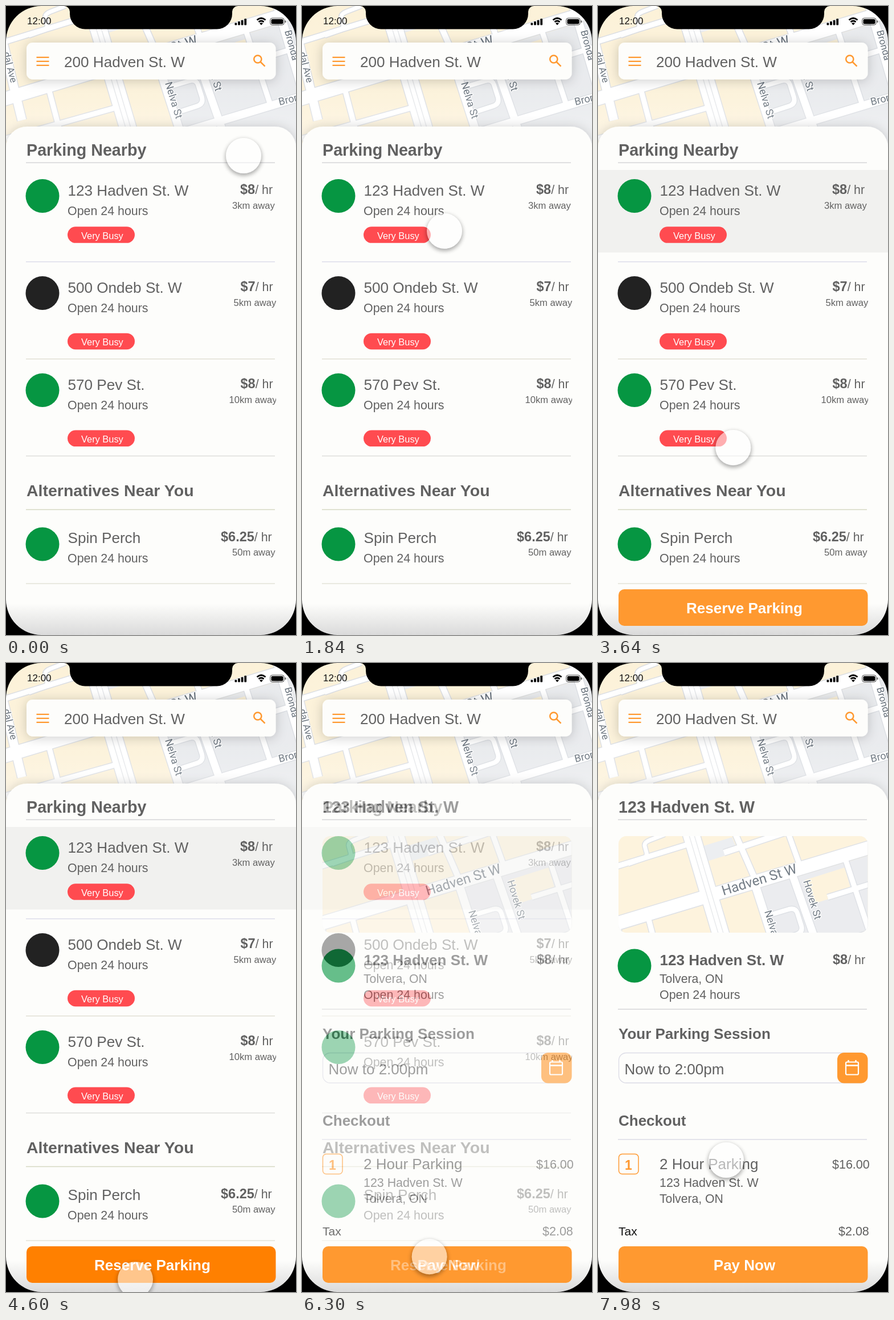
Write an HTML page that moves like this. It is 509 px wide and 1101 px high and loops after 8000 ms.

```html
<!DOCTYPE html>
<html lang="en">
<head>
<meta charset="utf-8">
<title>Parking app</title>
<style>
html, body { margin: 0; width: 100%; height: 100%; overflow: hidden; background: #000; }
#screen { position: relative; width: 100%; height: 100%; overflow: hidden; contain: strict; }
svg { position: absolute; left: 0; top: 0; display: block; }
text { font-family: "Liberation Sans", Arial, sans-serif; fill: #616161; white-space: pre; }
.street { font-family: Roboto, sans-serif; fill: #5a6570; stroke: #fff; stroke-width: 2.5px; paint-order: stroke; }
#touch {
  position: absolute; left: -31px; top: -31px; width: 62px; height: 62px; border-radius: 50%;
  background: rgba(255, 255, 255, .55); box-shadow: 0 3px 7px 1px rgba(0, 0, 0, .32);
}
</style>
</head>
<body>
<div id="screen">
  <svg id="stage" width="509" height="1101" viewBox="0 0 509 1101"></svg>
  <div id="touch"></div>
</div>
<script>
const ORANGE = '#ff9930', PAPER = '#fdfdfb', GREEN = '#069642';

const text = (x, y, size, str, extra = '') =>
  `<text x="${x}" y="${y}" font-size="${size}" ${extra}>${str}</text>`;
const bold = (x, y, size, str, extra = '') => text(x, y, size, str, 'font-weight="700" ' + extra);
const rect = (x, y, w, h, r, fill, extra = '') =>
  `<rect x="${x}" y="${y}" width="${w}" height="${h}" rx="${r}" fill="${fill}" ${extra}/>`;
const logo = (y, fill) => `<circle cx="64" cy="${y}" r="29.5" fill="${fill}"/>`;
const line = (y, color = '#d6d6d8') => rect(35, y - .75, 437, 1.5, 0, color);
const stroke = (d, color, width) =>
  `<path d="${d}" fill="none" stroke="${color}" stroke-width="${width}"/>`;
const price = (x, y, amount) =>
  `<text x="${x}" y="${y}" font-size="21.4"><tspan font-weight="700" font-size="23.5">${amount}</tspan>/ hr</text>`;
const street = (x, y, angle, size, str) =>
  text(x, y, size, str, `class="street" transform="rotate(${angle} ${x} ${y})"`);

function streetMap() {
  const roads = [
    ['M-10 45L28 200', 15], ['M0 62L150 16', 9], ['M40 52L68 42Q75 38 71 28L69 20Q68 14 78 10L104 0', 7],
    ['M75 145L100 240', 9], ['M0 232L200 176', 9], ['M224 -10L266 86', 10], ['M208 32L330 -8', 10],
    ['M318 -10L345 65', 9], ['M262 86L312 240', 14], ['M328 70L388 240', 13],
    ['M282 143L322 131Q334 128 337 138L344 160Q347 171 336 175L296 188', 8],
    ['M300 224L520 158', 14], ['M390 110L520 70', 9], ['M420 40L465 176', 9], ['M474 -10L530 180', 15],
    ['M-20 168L520 6', 23], ['M146 -15L222 240', 29]
  ];
  return rect(-30, -10, 560, 270, 0, '#fcf1d7') +
    '<path d="M268 95L520 20V260H312Z" fill="#e7e9ec"/>' +
    '<path d="M166 22L222 5L233 30L176 48Z" fill="#e9ebee"/>' +
    '<path d="M350 80L420 58L432 100L364 122Z" fill="#fcf1d7"/>' +
    roads.map(([d, w]) => stroke(d, '#d9dce1', w + 3)).join('') +
    roads.map(([d, w]) => stroke(d, '#fff', w)).join('') +
    stroke('M142 -15L218 240M151 -15L227 240', '#e4e6e9', 1.5) +
    street(207, 107, -17, 24, 'Hadven St W') + street(279, 135, 73, 18, 'Nelva St') +
    street(347, 82, 73, 18, 'Hovek St') + street(489, 44, 75, 17, 'Bronda') +
    street(480, 174, -14, 18, 'Brondal') + street(-5, 82, 76, 17, 'dal Ave');
}

function listing(y, name, amount, priceX, distance, distanceX, pillY) {
  return text(108.5, y, 26.1, name) + text(108, y + 34.3, 21.4, 'Open 24 hours') +
    price(priceX, y - 3, amount) +
    text(distanceX, y + 22.5, 16.6, distance, 'clip-path="url(#edge)"') +
    (pillY ? rect(108, pillY, 118, 28.5, 14.25, '#ff4b50') +
      text(132, pillY + 21.5, 16.4, 'Very Busy', 'style="fill:#fff"') : '');
}

const button = (label, id = '') =>
  rect(36, 1021, 437.5, 64, 10, ORANGE, id && `id="${id}"`) +
  bold(257, 1063, 26, label, 'text-anchor="middle" style="fill:#fff"');
const floorShade = () => rect(0, 1046, 509, 55, 0, 'url(#floor)');

const listPage = () =>
  bold(36, 261.5, 28.7, 'Parking Nearby') + line(274.3) +
  `<g id="highlight">${rect(0, 287, 509, 144.5, 0, '#f1f1ef')}</g>` +
  logo(332.5, GREEN) + listing(332, '123 Hadven St. W', '$8', 411, '3km away', 397, 386.3) + line(447.7, '#dcdcea') +
  logo(502.5, '#222') + listing(502, '500 Ondeb St. W', '$7', 411.5, '5km away', 399.5, 572.7) + line(617.8, '#e2e1d6') +
  logo(672.5, GREEN) + listing(672, '570 Pev St.', '$8', 411.5, '10km away', 391.5, 742.6) + line(787.6, '#dededa') +
  bold(36, 858, 28.5, 'Alternatives Near You') + line(881.5, '#d5d8c2') +
  logo(942, GREEN) + listing(939.5, 'Spin Perch', '$6.25', 377, '50m away', 397) + line(1011, '#e4e4d8') +
  floorShade() +
  `<g id="reserve">${button('Reserve Parking', 'reserveFill')}</g>`;

const detailPage = () =>
  rect(0, 240, 509, 861, 0, PAPER) +
  bold(36, 261.5, 28.7, '123 Hadven St. W') + line(274.3) +
  '<g clip-path="url(#card)"><use href="#map" x="13" y="300"/>' +
  rect(36, 303, 438, 169, 0, '#fff', 'opacity=".15"') + '</g>' +
  logo(530, GREEN) + bold(108.5, 528.5, 26.1, '123 Hadven St. W') + price(412, 526.5, '$8') +
  text(108, 560, 21.2, 'Tolvera, ON') + text(108, 588, 21.4, 'Open 24 hours') + line(606) +
  bold(36, 658, 26, 'Your Parking Session') +
  rect(36.5, 682.5, 436, 52.5, 13, PAPER, 'stroke="#dcdce6" stroke-width="1.3"') +
  rect(420, 682, 53.5, 53.5, 12, ORANGE) +
  rect(435, 698.5, 22, 22, 2, 'none', 'stroke="#fff" stroke-width="2.2"') +
  stroke('M435 704.5H457M439.5 695V699M452.5 695V699', '#fff', 2.4) +
  text(46.5, 720, 26, 'Now to 2:00pm') +
  bold(36, 810, 26, 'Checkout') + line(834, '#dcdce6') +
  rect(36.5, 859.5, 34.5, 35, 6, 'none', `stroke="${ORANGE}" stroke-width="1.5"`) +
  bold(53.5, 886.5, 23, '1', `text-anchor="middle" style="fill:${ORANGE}"`) +
  text(108, 886, 26, '2 Hour Parking') + text(411, 884.5, 21.5, '$16.00') +
  text(108, 916.5, 21.4, '123 Hadven St. W') + text(108, 945, 21.2, 'Tolvera, ON') +
  text(36, 1002, 21, 'Tax', 'style="fill:#111"') + text(422, 1002, 21.5, '$2.08') +
  floorShade() + button('Pay Now');

const searchBar = () =>
  rect(36, 64, 437.5, 64.5, 11, PAPER, 'filter="url(#soft)"') +
  stroke('M53.5 89.9H75.5M53.5 96.9H75.5M53.5 103.9H75.5', ORANGE, 2.3) +
  text(102, 107, 26.1, '200 Hadven St. W') +
  stroke('M435.2 93a6.6 6.6 0 1 0 13.2 0a6.6 6.6 0 1 0 -13.2 0M446.8 98L454.5 105.7', ORANGE, 2.5);

const phone = () =>
  `<path d="M-1 -1H510V1102H-1Z M62 0A62 62 0 0 0 0 62V1039A62 62 0 0 0 62 1101H447A62 62 0 0 0 509 1039V62A62 62 0 0 0 447 0Z" fill-rule="evenodd"/>` +
  '<path d="M102 0A10 10 0 0 1 112 10V13A27 27 0 0 0 139 40.5H370A27 27 0 0 0 397 13V10A10 10 0 0 1 407 0Z"/>' +
  text(37, 32, 17, '12:00', 'style="fill:#111"') +
  [0, 1, 2, 3].map(i => rect(401.5 + i * 5.6, 29.5 - i * 2.4, 3.8, 4 + i * 2.4, 1, '#000')).join('') +
  stroke('M440.5 24.5Q448 18 455.5 24.5M443.5 28Q448 24 452.5 28', '#000', 2.8) +
  '<path d="M445 30.3Q448 28 451 30.3L448 33.5Z"/>' +
  rect(463.7, 21.2, 24.5, 12, 3.6, 'none', 'stroke="#444" stroke-width="1"') +
  rect(465.5, 23, 21, 8.5, 2, '#000') + rect(489.7, 25.2, 1.6, 4, .8, '#444');

document.getElementById('stage').innerHTML = `
<defs>
  <filter id="soft" x="-20%" y="-50%" width="140%" height="200%">
    <feDropShadow dx="0" dy="2" stdDeviation="10" flood-opacity=".2"/></filter>
  <linearGradient id="floor" x2="0" y2="1"><stop stop-color="#dadada" stop-opacity="0"/>
    <stop offset="1" stop-color="#dadada"/></linearGradient>
  <linearGradient id="haze" x2="0" y2="1"><stop stop-color="#fff" stop-opacity=".05"/>
    <stop offset=".6" stop-color="#fff" stop-opacity=".12"/><stop offset="1" stop-color="#fff" stop-opacity=".45"/></linearGradient>
  <clipPath id="edge"><rect width="474" height="1101"/></clipPath>
  <clipPath id="card"><rect x="36" y="303" width="437.5" height="169" rx="14"/></clipPath>
  <g id="map">${streetMap()}</g>
</defs>
<use href="#map"/>${rect(0, 0, 509, 260, 0, 'url(#haze)')}
${searchBar()}
${rect(0, 211, 509, 920, 37, PAPER, 'filter="url(#soft)"')}
<g id="list">${listPage()}</g>
<g id="detail">${detailPage()}</g>
${phone()}`;

const [highlight, reserve, reserveFill, detail, touch] =
  ['highlight', 'reserve', 'reserveFill', 'detail', 'touch'].map(id => document.getElementById(id));

// Touch path: step, x, y
const path = [
  [1, 417, 262], [6, 417, 262], [27, 250, 394], [64, 250, 393.5], [92, 227, 1079],
  [101, 227, 1079], [114, 224, 1040], [146, 223.5, 1039], [170, 225, 870], [173, 225, 870]
];
const ramp = (n, a, b) => Math.min(1, Math.max(0, (n - a) / (b - a)));
const ease = p => p * p * (3 - 2 * p);
const mix = (a, b, p) => a + (b - a) * p;

// Three steps per 140 ms, lasting 20, 20 and 100 ms
function stepAt(ms) {
  const t = ms + 20, rest = t % 140;
  return 3 * Math.floor(t / 140) + (rest < 20 ? 0 : rest < 40 ? 1 : 2);
}

function draw(ms) {
  const n = stepAt(ms);
  const i = Math.max(1, path.findIndex(k => k[0] >= n));
  const [n0, x0, y0] = path[i - 1], [n1, x1, y1] = path[i];
  const p = ease(ramp(n, n0, n1));
  touch.style.transform = `translate(${mix(x0, x1, p)}px, ${mix(y0, y1, p)}px)`;

  const shown = ramp(n, 50, 59.6);
  highlight.setAttribute('opacity', shown);
  reserve.setAttribute('opacity', shown);

  const press = ramp(n, 94, 97) * (1 - ramp(n, 108, 112));
  reserveFill.setAttribute('fill', `rgb(255,${mix(153, 128, press)},${mix(48, 0, press)})`);
  detail.setAttribute('opacity', ease(ramp(n, 132, 139)));
}

const start = performance.now();
function tick() {
  draw((performance.now() - start) % 8000);
  requestAnimationFrame(tick);
}
draw(0);
requestAnimationFrame(tick);
</script>
</body>
</html>
```
